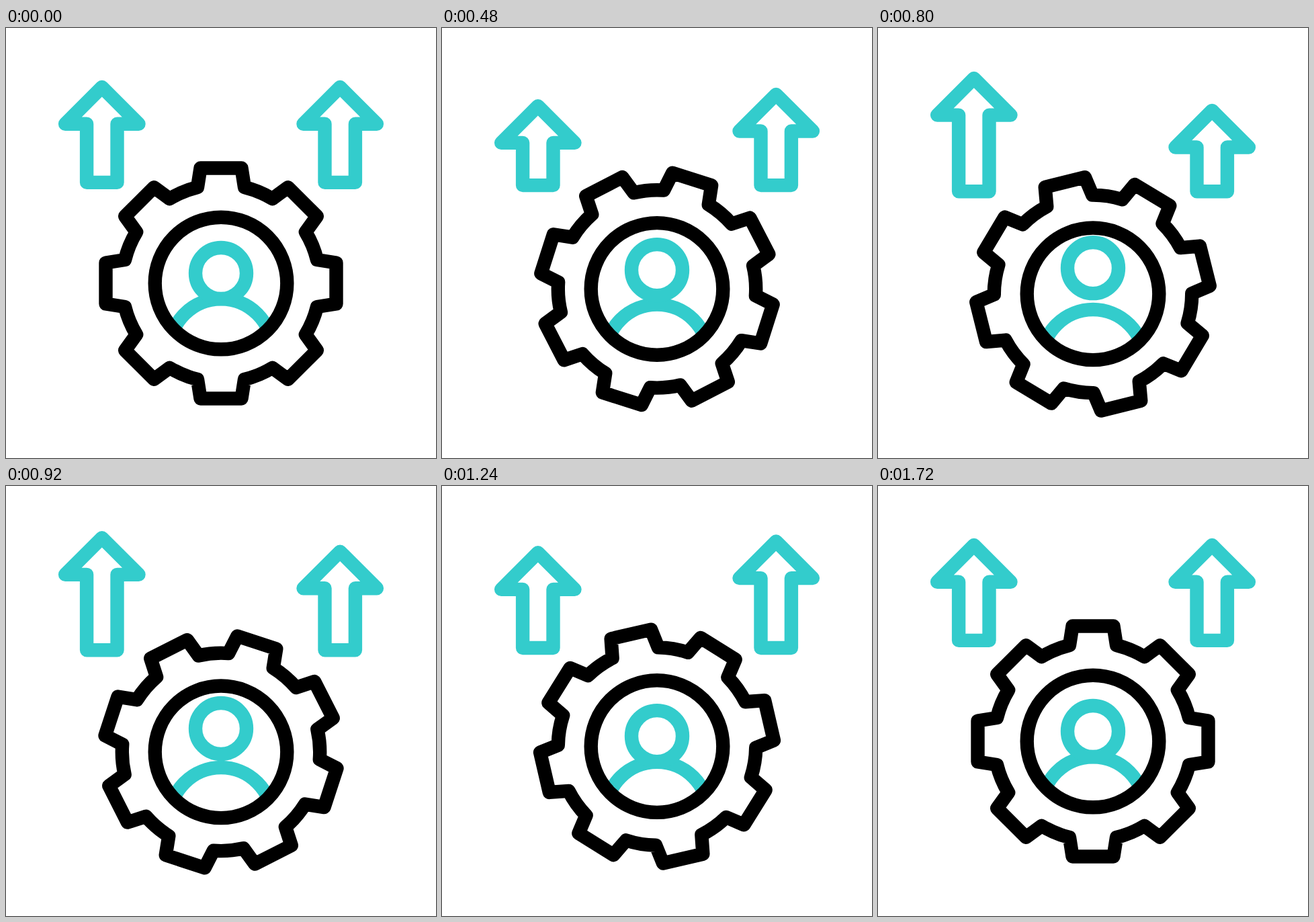
An HTML page for the animation above (1.8 s loop, 640 by 640 pixels).

```html
<!DOCTYPE html>
<html lang="en">
<head>
<meta charset="utf-8">
<title>Gear and arrows</title>
<style>
  html, body { margin: 0; width: 100%; height: 100%; overflow: hidden; background: #fff; }
  svg { display: block; width: 100vw; height: 100vh; }
  svg * { fill: none; stroke-width: 20.4; stroke-linejoin: round; }
  .teal { stroke: #33cccc; }
  .ink { stroke: #000; }
</style>
</head>
<body>
<svg viewBox="0 0 640 640">
  <clipPath id="hole"><circle cx="0" cy="0" r="98"/></clipPath>
  <path id="left" class="teal"/>
  <path id="right" class="teal"/>
  <g id="wheel">
    <g clip-path="url(#hole)">
      <circle class="teal" cy="99.7" r="76.5"/>
      <circle id="head" class="teal" r="38"/>
    </g>
    <circle class="ink" r="98.3"/>
    <path id="gear" class="ink"/>
  </g>
</svg>
<script>
const LOOP = 1800, STEP = 40;
const $ = id => document.getElementById(id);

// Cubic easing with control points (x1, 0) and (x2, 1)
function ease(u, x1 = 0.5, x2 = 0.5) {
  if (u <= 0) return 0;
  if (u >= 1) return 1;
  let lo = 0, hi = 1, p;
  for (let i = 0; i < 30; i++) {
    p = (lo + hi) / 2;
    const q = 1 - p;
    if (3 * x1 * p * q * q + 3 * x2 * p * p * q + p ** 3 < u) lo = p; else hi = p;
  }
  return p * p * (3 - 2 * p);
}

// Each key is [time, value]
function track(keys, t) {
  if (t <= keys[0][0]) return keys[0][1];
  for (let i = 1; i < keys.length; i++) {
    const [a, from] = keys[i - 1], [b, to] = keys[i];
    if (t <= b) return from + (to - from) * ease((t - a) / (b - a));
  }
  return keys[keys.length - 1][1];
}

const wheelY = [[80, 0], [860, 16], [1600, 0]];
const baseY = [[160, 0], [980, 14.5], [1720, 0]];
const headY = [[180, 0], [750, -24], [1300, 0]];
const stretch = [[80, 0], [500, -24], [840, 27.5], [1200, 0]];
const RIGHT_DELAY = 240;

function gearPath() {
  const tooth = [[-35, -143], [-30.5, -171.5], [30.5, -171.5], [35, -143]];
  let d = '';
  for (let i = 0; i < 8; i++) {
    const c = Math.cos(i * Math.PI / 4), s = Math.sin(i * Math.PI / 4);
    tooth.forEach(([x, y], k) => {
      const cmd = k ? 'L' : i ? 'A147.2 147.2 0 0 1 ' : 'M';
      d += `${cmd}${(x * c - y * s).toFixed(2)} ${(x * s + y * c).toFixed(2)}`;
    });
  }
  return d + 'A147.2 147.2 0 0 1 -35 -143Z';
}

function arrowPath(x, base, grow) {
  const tip = base - 141.9 - grow, wing = tip + 54.7;
  return `M${x} ${tip}L${x - 54.7} ${wing}H${x - 22.7}V${base}H${x + 22.7}V${wing}H${x + 54.7}Z`;
}

function draw(t) {
  const spin = 180 * ease((t - 84) / 1461, 0.58, 0.49);
  const base = 229.9 + track(baseY, t);
  $('wheel').setAttribute('transform', `translate(320 ${380 + track(wheelY, t)})`);
  $('gear').setAttribute('transform', `rotate(${spin})`);
  $('head').setAttribute('cy', -15 + track(headY, t));
  $('left').setAttribute('d', arrowPath(142.8, base, track(stretch, t)));
  $('right').setAttribute('d', arrowPath(497.2, base, track(stretch, t - RIGHT_DELAY)));
}

$('gear').setAttribute('d', gearPath());
const start = performance.now();
function tick() {
  const t = (performance.now() - start) % LOOP;
  draw(Math.floor(t / STEP) * STEP);
  requestAnimationFrame(tick);
}
tick();
</script>
</body>
</html>
```
